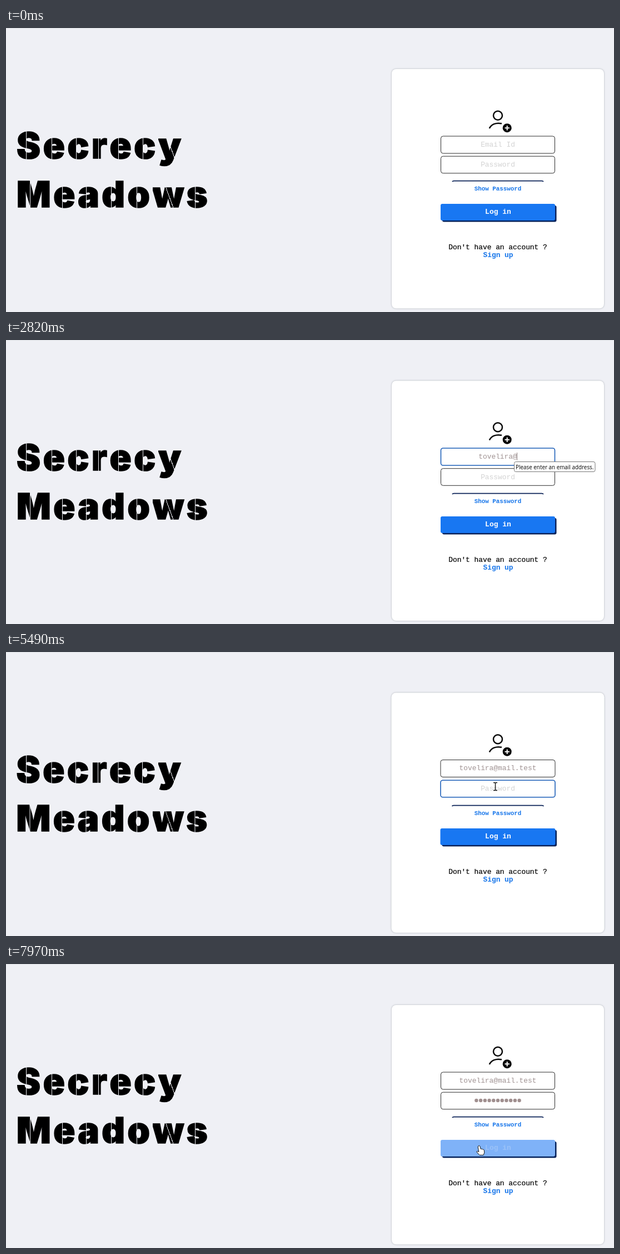
Recreate the animation shown at these times as an HTML page. Size 1094 by 512 pixels, loop 8 s.

```html
<!DOCTYPE html>
<html lang="en">
<head>
<meta charset="utf-8">
<title>Log in</title>
<style>
  html, body { margin: 0; width: 100%; height: 100%; overflow: hidden; background: #eff0f5; }
  svg { position: absolute; left: 0; top: 0; }
  h1 {
    position: absolute; left: 19px; top: 168px; margin: 0; white-space: nowrap;
    font: 900 64.6px/88px Inter, sans-serif; letter-spacing: 4.6px;
  }
  h1 span {
    display: inline-block; color: transparent;
    background: linear-gradient(var(--angle), #000 var(--cut), transparent var(--cut) calc(var(--cut) + 1px), #000 0);
    -webkit-background-clip: text; background-clip: text;
    -webkit-text-stroke: 1.6px transparent;
  }
  text { font: 12.87px "Liberation Mono", monospace; text-anchor: middle; white-space: pre; }
  .bold { font-weight: 700; fill: #1474ea; }
  .tip { font: 9.9px "Open Sans", sans-serif; text-anchor: start; }
  #card { filter: drop-shadow(0 0 1.5px #aaafb5); }
</style>
</head>
<body>
<h1 id="title"></h1>
<svg width="1094" height="512" viewBox="0 0 1094 512">
  <path d="M0 .5H1094" stroke="#e0e2e6"/>
  <rect id="card" rx="8" fill="#fff"/>
  <g id="icon" fill="none" stroke="#0b0b0b" stroke-width="2.5">
    <circle cx="885" cy="157.8" r="8"/>
    <path d="M869.8 181C873 174 881 170 892 172.3"/>
    <circle cx="901.7" cy="180.2" r="8" fill="#000" stroke="none"/>
    <path d="M901.7 176V184.4M897.5 180.2H905.9" stroke="#fff" stroke-width="2"/>
  </g>
  <rect id="emailBox" rx="4" fill="#fff"/>
  <rect id="passBox" rx="4" fill="#fff"/>
  <text id="emailText" x="885"/>
  <text id="passText" x="885"/>
  <g id="dots" fill="#a08f8f"></g>
  <path id="caret" stroke="#8d8080"/>
  <g id="lower">
    <path id="rule" fill="none" stroke="#0b2257" stroke-width="1.8"/>
    <text class="bold" x="885" y="293" style="font-size:10.87px">Show Password</text>
    <rect id="shadow" y="320" height="29.5" rx="3" fill="#03215a"/>
    <rect id="button" y="317" height="30" rx="3"/>
    <text id="login" class="bold" x="885.5" y="334.5" style="font-size:13px">Log in</text>
    <text x="885" y="399" stroke="#000" stroke-width=".2">Don't have an account ?</text>
    <text class="bold" x="885.5" y="413">Sign up</text>
  </g>
  <g id="tooltip">
    <rect x="914.5" y="219.5" width="145.5" height="18" rx="3" fill="#fff" stroke="#777"/>
    <text class="tip" x="917" y="232.5">Please enter an email address.</text>
  </g>
  <g id="pointer">
    <circle id="glow" cy="-1" r="10.7" fill="#fffb5c" opacity=".85"/>
    <path id="beam" d="M-3.5-7H-1L0-6L1-7H3.5M0-6V6M-3.5 7H-1L0 6L1 7H3.5" fill="none" stroke="#111" stroke-width="1.4"/>
    <path id="arrow" d="M0 0V14L3.3 11L5.6 16L7.8 15L5.6 10.2H10Z" fill="#fff" stroke="#111"/>
    <path id="hand" d="M-3.5-7.5q1.5-1.5 2.7.3L.8-1.8q1-.9 2 .2 1.2-.8 2 .5 1.5-.4 1.9 1L7.3 4.5 5.5 9H-1.5L-6.5 3.4q-.2-1.7 1.8-1.3L-2.7 3.2-4.3-5.5Z" fill="#fff" stroke="#111"/>
  </g>
</svg>
<script>
const $ = id => document.getElementById(id);
const set = (id, attrs) => { for (const k in attrs) $(id).setAttribute(k, attrs[k]); };
const show = (id, on) => set(id, { visibility: on ? 'visible' : 'hidden' });
const count = (times, t) => times.filter(s => s <= t).length;

const LOOP = 8000, PITCH = 7.72, MID = 885;
const EMAIL = 'tovelira@mail.test';
const emailKeys = [1400, 1540, 1700, 1870, 2090, 2170, 2360, 2560, 2820, 2960,
  3150, 3290, 3430, 3560, 3680, 3810, 3940, 4070];
const passKeys = [5620, 5840, 6040, 6240, 6440, 6640, 6840, 7000, 7170, 7360, 7500];

// Pointer moves: start, end of move, hidden again, from, to
const moves = [
  [260, 540, 1400, [940, 258], [917.5, 202.5]],
  [4470, 4700, 5620, [917.5, 202.5], [880.5, 242.5]],
  [7570, 7840, LOOP, [880.5, 242.5], [853.5, 335.5]]
];

// Stencil lettering: one thin slit through every letter
for (const word of ['Secrecy', 'Meadows']) {
  for (const ch of word) {
    const slanted = 'yw'.includes(ch);
    const span = document.createElement('span');
    span.textContent = ch;
    span.style.setProperty('--angle', slanted ? '70deg' : '90deg');
    span.style.setProperty('--cut', slanted ? '47%' : '36%');
    $('title').append(span);
  }
  $('title').append(document.createElement('br'));
}

$('dots').innerHTML = passKeys.map(() => '<circle r="3.2"/>').join('');

function field(name, y, height, focused, inset, value, hint, baseline) {
  set(name + 'Box', {
    x: 782.5 - inset, y, width: 205 + 2 * inset, height,
    stroke: focused ? '#1d5fb8' : '#2c2c2c', 'stroke-width': focused ? 1.6 : 1
  });
  $(name + 'Text').textContent = value || hint;
  set(name + 'Text', { y: baseline, fill: value ? '#a09393' : '#d3d3d3' });
}

function drawPointer(t) {
  const move = moves.find(m => t >= m[0] && t < m[2]);
  show('pointer', move);
  for (const id of ['glow', 'beam', 'arrow', 'hand']) $(id).style.display = 'none';
  if (!move) return;
  const [start, end, , from, to] = move;
  const p = Math.min(1, Math.floor((t - start) / 67.5) * 67.5 / (end - start));
  const ease = p * p * (3 - 2 * p);
  const [x, y] = from.map((v, i) => v + (to[i] - v) * ease);
  set('pointer', { transform: `translate(${x} ${y})` });
  $(y < 262 ? 'beam' : y < 317 ? 'arrow' : 'hand').style.display = '';
  if (t >= 600 && t < 940 || t >= 4810 && t < 5020) $('glow').style.display = '';
}

function draw(t) {
  const onEmail = t >= 600 && t < 4880;
  const onPass = t >= 4880 && t < 7940;
  const focused = onEmail || onPass;
  const inset = onPass ? .5 : 0;
  const grow = focused ? .5 : 0;
  const typed = count(emailKeys, t), dots = count(passKeys, t);

  $('title').style.transform = `translateX(${-inset}px)`;
  set('card', { x: 694 - inset, y: 74 - grow, width: 382 + 2 * inset, height: 431.5 + 2 * grow });
  set('icon', { transform: `translate(0 ${-grow})` });
  set('lower', { transform: `translate(0 ${2 * grow})` });
  set('rule', { d: `M${803 - inset} 277q1-1.3 3-1.3H${964 + inset}q2 0 3 1.3` });
  set('shadow', { x: 785 - inset, width: 205.5 + 2 * inset });

  field('email', onPass ? 194.5 : 195, 31, onEmail, inset, EMAIL.slice(0, typed), 'Email Id', onPass ? 213 : 213.5);
  field('pass', onEmail ? 231.7 : 231.2, 30.6, onPass, inset, '', dots ? ' ' : 'Password', onEmail ? 250.5 : 250);
  [...$('dots').children].forEach((dot, i) => {
    dot.setAttribute('cx', MID + (i - (dots - 1) / 2) * PITCH);
    dot.setAttribute('cy', 246);
    dot.setAttribute('visibility', i < dots ? 'visible' : 'hidden');
  });

  const keys = onPass ? passKeys : emailKeys, n = onPass ? dots : typed;
  show('caret', focused && n && (t - keys[n - 1]) % 1000 < 500);
  set('caret', { d: `M${Math.floor(MID + n * PITCH / 2) + .5} ${onPass ? 239.5 : 203}v14` });

  const hover = t >= 7840;
  set('button', { x: 782 - inset, width: 206 + 2 * inset, fill: hover ? '#7fb2f8' : '#1877f2' });
  $('login').style.fill = hover ? '#9bc2f8' : '#fff';
  show('tooltip', t >= 1270 && t < 4470);
  drawPointer(t);
}

const begin = performance.now();
(function frame() {
  draw((performance.now() - begin) % LOOP);
  requestAnimationFrame(frame);
})();
</script>
</body>
</html>
```
